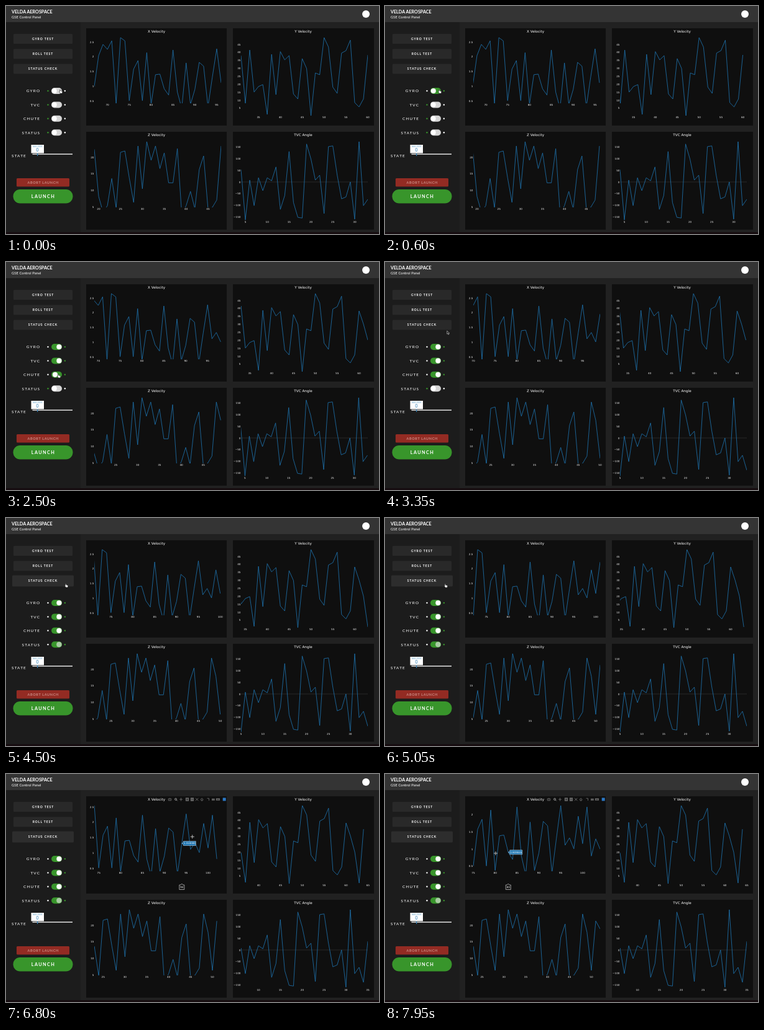
An HTML page for the animation above (8 s loop, 600x368 px).

```html
<!DOCTYPE html>
<html lang="en">
<head>
<meta charset="utf-8">
<title>GSE Control Panel</title>
<style>
  html, body { margin: 0; width: 100%; height: 100%; overflow: hidden; background: #212121; }
  svg { display: block; width: 600px; height: 368px; }
  text { font-family: Lato, sans-serif; fill: #fff; }
  .bold { font-weight: 700; }
  .mid { text-anchor: middle; }
  .end { text-anchor: end; }
  .plot text { font-family: "DejaVu Sans", Verdana, sans-serif; }
  .ticks text { font-size: 4.2px; fill: #e8e8e8; }
  .line { fill: none; stroke: #1f77b4; stroke-width: .8; stroke-linejoin: round; }
</style>
</head>
<body>
<svg id="stage" viewBox="0 0 600 368"></svg>
<script>
const LOOP = 8000, SLIDE = 750, SPAN = 29, WIDTH = 204;
const stage = document.getElementById('stage');
const clamp = v => Math.max(0, Math.min(1, v));
const mix = (a, b, p) => a + (b - a) * p;
const cubic = p => p < .5 ? 4 * p ** 3 : 1 - 4 * (1 - p) ** 3;
const smooth = p => p * p * (3 - 2 * p);

function add(parent, tag, attrs = {}, content) {
  const el = document.createElementNS('http://www.w3.org/2000/svg', tag);
  set(el, attrs);
  if (content !== undefined) el.textContent = content;
  parent.appendChild(el);
  return el;
}
function set(el, attrs) {
  for (const k in attrs) el.setAttribute(k, attrs[k]);
}
const box = (parent, x, y, width, height, fill, rx = 0) =>
  add(parent, 'rect', { x, y, width, height, fill, rx });
function label(parent, content, x, y, size, cls = '', spacing = 0, fill) {
  const el = add(parent, 'text', { x, y, dy: '.36em', 'font-size': size, class: cls, 'letter-spacing': spacing }, content);
  if (fill) el.style.fill = fill;
  return el;
}

// Page frame
box(stage, 0, 0, 600, 368, '#212121');
box(stage, 0, 26, 120, 342, '#1c1c1c');
box(stage, 0, 0, 600, 26, '#343434');
box(stage, 0, 365, 600, 3, '#160d10');
label(stage, 'VELDA AEROSPACE', 9, 9.3, 7.2, 'bold');
label(stage, 'GSE Control Panel', 9, 18.3, 5.9);
add(stage, 'circle', { cx: 579, cy: 13, r: 6, fill: '#fff' });

// Sidebar
const buttons = ['GYRO TEST', 'ROLL TEST', 'STATUS CHECK'].map((name, i) => {
  const y = 45 + 24.2 * i;
  const rect = box(stage, 12, y, 95, 16, '#292929', 1.5);
  label(stage, name, 59.5, y + 8, 5, 'bold mid', .95);
  return rect;
});

const toggles = [['GYRO', 600], ['TVC', 1600], ['CHUTE', 2450], ['STATUS', 4050]].map(([name, click], i) => {
  const y = 137 + 22.4 * i;
  label(stage, name, 55.2, y, 6.5, 'end', 1.1);
  return {
    click,
    left: add(stage, 'circle', { cx: 67.5, cy: y, r: 1.2 }),
    right: add(stage, 'circle', { cx: 94.8, cy: y, r: 1.2 }),
    body: box(stage, 73, y - 5, 17, 10, '#ddd', 5),
    knob: add(stage, 'circle', { cy: y, r: 4.1, fill: '#fff', stroke: '#bbb', 'stroke-width': .2 })
  };
});

label(stage, 'STATE', 9, 241.3, 6.5, '', 1.1);
box(stage, 42.5, 238.4, 64.5, 1.4, '#f2f2f2');
box(stage, 50, 236.5, 1.3, 5.5, '#2f7fb5');
box(stage, 40.5, 224, 20.5, 13.5, '#fff');
label(stage, 'FAKE STATE', 50.7, 227, 2.9, 'mid', 0, '#6aa5cc');
label(stage, '0', 50.5, 232.8, 7, 'mid', 0, '#2f7fb5');
box(stage, 17, 278, 85, 13.5, '#932b23', 1.5);
label(stage, 'ABORT LAUNCH', 59.7, 284.8, 5.5, 'bold mid', .65, '#c98d86');
box(stage, 11.5, 296, 96, 22.5, '#38952b', 11.2);
label(stage, 'LAUNCH', 60, 307.2, 7.3, 'bold mid', 1.4);

// Charts: the axis slides first, the new sample appears when the slide ends
const plots = [
  {
    title: 'X Velocity', x: 129, y: 36, first: 67, top: 51, bottom: 157, step: .5,
    starts: Array.from({ length: 8 }, (_, i) => 350 + 970 * i),
    lo: n => n < 7 ? .42 : n < 8 ? .4 : .355,
    data: [.99, 2.04, 2.42, 2.25, 2.54, .4, 2.65, 2.54, .51, 1.58, 1.87, .51, 2.14, .38, 1.39, 1.41, .909045, .7,
      2.23, .8, .25, 1.79, .38, .89, 1.81, 1.68, .3, 1.31, 2.27, 1.115602, 1.33, 1.01, 1.96, 1.16, 2.23, .8, 1.3, 1]
  },
  {
    title: 'Y Velocity', x: 365, y: 36, first: 31, top: 51, bottom: 177, step: 5,
    starts: [60, 1340, 3070, 4620, 6190], lo: () => .3,
    data: [38, 8.1, 41.5, 15.1, 18.6, 19.8, 1.1, 38.8, 13.5, 40.5, 35.3, 38, 13.9, 10.8, 36.1, 29.9, .3, 27.1,
      26, 49.3, 43.4, 18.2, 14.3, 39.6, 41.1, 47.7, 8.5, 5.8, 10.8, 38.4, 30.2, 20.1, .7, 34.5]
  },
  {
    title: 'Z Velocity', x: 129, y: 203, first: 19, top: 219, bottom: 325, step: 5,
    starts: [350, 2290, 4230, 6170], lo: () => 4.9,
    data: [22.4, 8.2, 3.5, 5.4, 13.6, 4.7, 21.5, 21.9, 13.8, 6.4, 23.4, 10.5, 24.7, 19.1, 23.4, 16.6, 21.3, 12.3,
      12.3, 22.6, 3, 5.4, 9.7, 4.5, 16.3, 20.4, 4.5, 4.9, 7.1, 23.4, 17.9, 6.4, 21.3, 18.9]
  },
  {
    title: 'TVC Angle', x: 365, y: 203, first: 4, top: 219, bottom: 346, step: 50, zero: true,
    starts: [2290, 5170], lo: () => -164,
    data: [53, -162, 8, -101, 18, -37, 18, 5, 64, -117, -58, 130, -88, -151, -154, 162, 98, 8,
      29, -135, 151, 154, 29, -72, -64, 0, -159, 172, -101, -74, -138, 37]
  }
];

plots.forEach((p, i) => {
  p.left = p.x + 13;
  const g = add(stage, 'g', { class: 'plot' });
  box(g, p.x, p.y, i % 2 ? 227 : 226, i < 2 ? 157 : 158, '#0f0f0f');
  label(g, p.title, p.x + 113, p.y + 5.4, 5.7, 'mid');
  const clip = add(g, 'clipPath', { id: 'clip' + i });
  box(clip, p.left, p.top - 1, WIDTH, p.bottom - p.top + 1);
  if (p.zero) box(g, p.left, 283.7, WIDTH, .6, '#3a3a3a');
  p.ticks = add(g, 'g', { class: 'ticks' });
  p.line = add(g, 'path', { class: 'line', 'clip-path': `url(#clip${i})` });
});

function drawPlot(p, t) {
  const begun = p.starts.filter(s => s <= t).length;
  const progress = begun ? clamp((t - p.starts[begun - 1]) / SLIDE) : 1;
  const done = progress < 1 ? begun - 1 : begun;
  const eased = cubic(progress);
  const prev = Math.max(0, begun - 1);
  const high = n => Math.max(...p.data.slice(n, n + SPAN + 1));
  const from = p.first + mix(prev, begun, eased);
  const lo = mix(p.lo(prev), p.lo(begun), eased);
  const hi = mix(high(prev), high(begun), eased);

  p.px = v => p.left + (v - from) * WIDTH / SPAN;
  p.py = v => mix(p.bottom, p.top, (v - lo) / (hi - lo));
  p.index = px => Math.round(from + (px - p.left) * SPAN / WIDTH) - p.first;

  const points = p.data.slice(0, done + SPAN + 1)
    .map((v, i) => p.px(p.first + i).toFixed(2) + ' ' + p.py(v).toFixed(2));
  p.line.setAttribute('d', 'M' + points.join('L'));

  let html = '';
  const tick = (cls, x, y, s) => {
    html += `<text class="${cls}" x="${x.toFixed(2)}" y="${y.toFixed(2)}" dy=".36em">${s}</text>`;
  };
  for (let v = Math.ceil((from - .05) / 5) * 5; v <= from + SPAN + .05; v += 5) tick('mid', p.px(v), p.bottom + 2.4, v);
  for (let v = Math.ceil(lo / p.step) * p.step; v <= hi; v += p.step)
    tick('end', p.left - .5, p.py(v), String(v).replace('-', '\u2212'));
  p.ticks.innerHTML = html;
}

// Chart toolbar
const bar = add(stage, 'g', { fill: 'none', stroke: '#6b6b6b', 'stroke-width': .9 });
const icon = (d, attrs = {}) => add(bar, 'path', { d, ...attrs });
icon('M261.3 39.8h4.4v3h-4.4zM262.8 39.3h1.4M263 41.3h1');
add(bar, 'circle', { cx: 273, cy: 40.7, r: 1.5, stroke: '#aaa' });
icon('M274 41.7l1.6 1.6', { stroke: '#aaa' });
icon('M279 41h5M281.5 38.5v5');
for (const x of [291.5, 299.5]) box(bar, x - 2.2, 38.8, 4.4, 4.4, '#6b6b6b');
icon('M290 41h3M291.5 39.5v3M298 41h3', { stroke: '#0f0f0f', 'stroke-width': .6 });
icon('M305 38.8l4.4 4.4M309.4 38.8l-4.4 4.4');
icon('M312.8 41.2l2.3-2.1 2.3 2.1M314 41v2h2.2v-2');
icon('M323.5 39.3h3v3.6');
icon('M331 40.3h4.8M331 42h4.8M338.5 40h4.8v2.2h-4.8z', { 'stroke-width': 1.3 });
box(bar, 348.7, 38.4, 5, 5, '#2b78c5').setAttribute('stroke', 'none');

// Hover labels
const hover = add(stage, 'g', { class: 'plot' });
const valueTag = add(hover, 'g');
add(valueTag, 'path', { d: 'M0 0l2.5-1.8V-3.5h20v7h-20V1.8z', fill: '#1f77b4', stroke: '#dce8f2', 'stroke-width': .5 });
const valueText = label(valueTag, '', 12.5, 0, 4, 'mid');
const indexTag = add(hover, 'g');
add(indexTag, 'path', { d: 'M0-5l2 2h2v7.5h-8V-3h2z', fill: '#151515', stroke: '#eee', 'stroke-width': .6 });
const indexText = label(indexTag, '', 0, .8, 4, 'mid');

// Pointer
const pointer = add(stage, 'g');
const shapes = {
  hand: add(pointer, 'path', { d: 'M-1.6-2.6q.7-.6 1.2 0l.4 1.6 2 .5q1 .3.8 1.4l-.6 2.1H-.6L-2.4.6q0-.8.9-.5z', fill: '#fff', stroke: '#222', 'stroke-width': .6 }),
  arrow: add(pointer, 'path', { d: 'M-1.2-2.8v5l1.2-1 .9 1.9.9-.4-.8-1.8h1.6z', fill: '#111', stroke: '#ddd', 'stroke-width': .6 }),
  cross: add(pointer, 'path', { d: 'M-3 0h6M0-3v6', stroke: '#ccc', 'stroke-width': .9 })
};
const route = [
  [0, 88, 138], [750, 88, 138], [1150, 86, 160], [1750, 86, 160], [2150, 85, 184], [2650, 85, 184],
  [3300, 101, 114], [3400, 101, 114], [3700, 97, 109], [5000, 97, 109], [5600, 134, 122], [5800, 134, 122],
  [6300, 225, 112], [6950, 322, 98], [7050, 322, 98], [7950, 178, 128], [8000, 176, 128]
];
function pointerAt(t) {
  const i = route.findIndex(r => r[0] > t);
  const [a, b] = [route[i - 1], route[i]];
  const raw = (t - a[0]) / (b[0] - a[0]);
  const p = t > 5800 ? raw : smooth(raw);
  return [mix(a[1], b[1], p), mix(a[2], b[2], p)];
}

function drawPointer(t) {
  const [x, y] = pointerAt(t);
  const inChart = x > 142;
  const kind = inChart ? 'cross' : (t > 2700 && t < 3550) || t > 5150 ? 'arrow' : 'hand';
  pointer.setAttribute('transform', `translate(${x.toFixed(2)} ${y.toFixed(2)})`);
  for (const k in shapes) shapes[k].style.display = k === kind ? '' : 'none';
  bar.style.display = x > 130 ? '' : 'none';
  hover.style.display = inChart ? '' : 'none';
  if (!inChart) return;
  const p = plots[0];
  const i = p.index(Math.max(p.left, pointerAt(t - 110)[0]));
  const px = p.px(p.first + i);
  valueTag.setAttribute('transform', `translate(${px} ${p.py(p.data[i])})`);
  indexTag.setAttribute('transform', `translate(${px} 182)`);
  valueText.textContent = p.data[i].toFixed(6);
  indexText.textContent = p.first + i;
}

function drawControls(t) {
  const grow = 2 * clamp((t - 3600) / 150);
  set(buttons[2], { x: 12 - grow, width: 95 + 2 * grow, y: 93.4 - grow / 2, height: 16 + grow,
    fill: grow ? '#2d2d2d' : '#292929' });
  toggles.forEach((s, i) => {
    const on = t >= s.click;
    s.left.setAttribute('fill', on ? '#fff' : '#38952b');
    s.right.setAttribute('fill', on ? '#38952b' : '#fff');
    s.body.setAttribute('fill', on ? '#38952b' : '#d6d6d6');
    set(s.knob, { cx: mix(77.8, 85.4, smooth(clamp((t - s.click) / 200))), fill: on && i === 3 ? '#a9cba3' : '#fff' });
  });
}

function render(now) {
  const t = now % LOOP;
  plots.forEach(p => drawPlot(p, t));
  drawControls(t);
  drawPointer(t);
}
function frame() {
  render(performance.now());
  requestAnimationFrame(frame);
}
frame();
</script>
</body>
</html>
```
